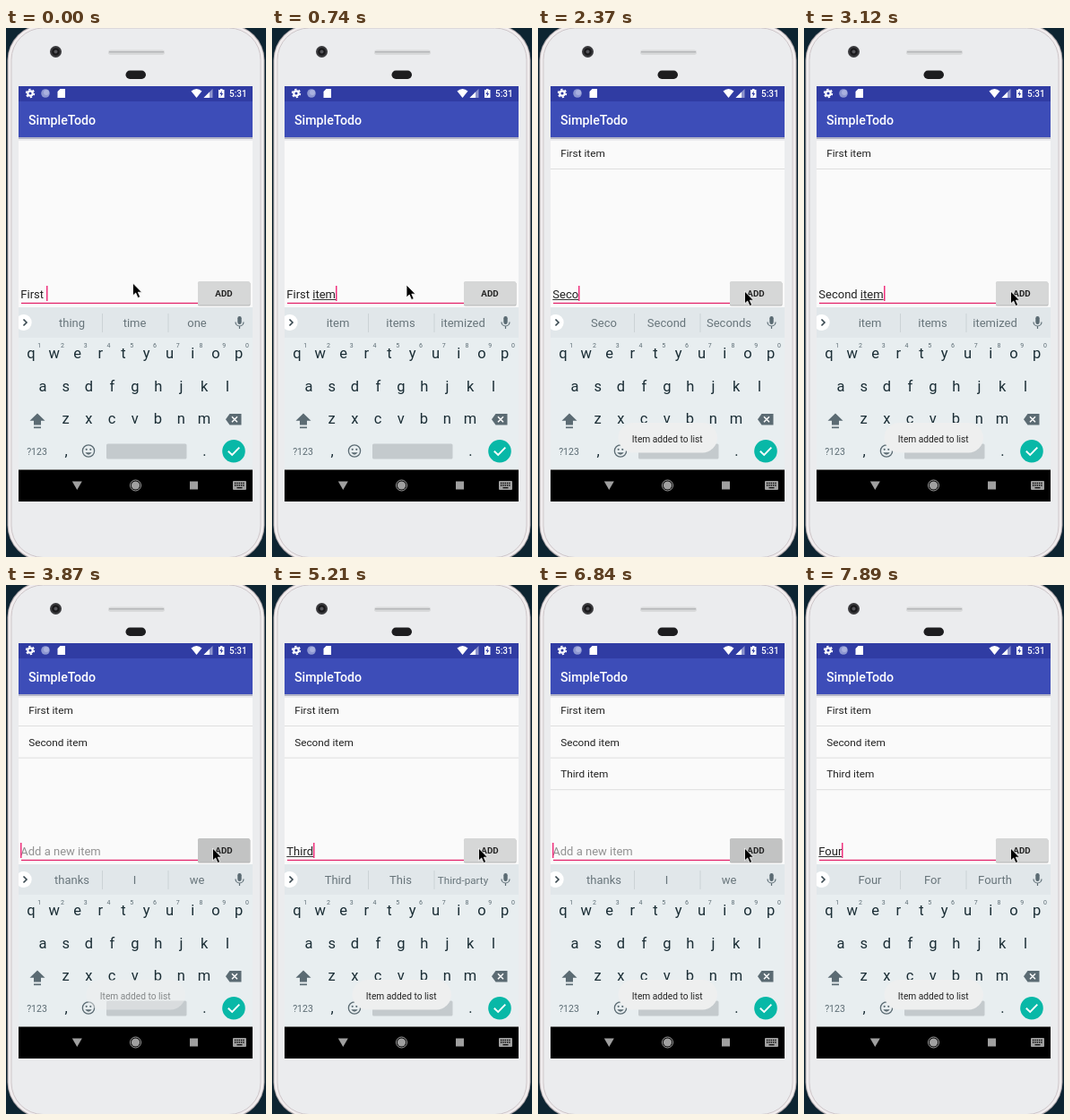
These frames come from a looping animation (290 px wide and 591 px high, 8000 ms). An HTML page:

```html
<!DOCTYPE html>
<html lang="en">
<head>
<meta charset="utf-8">
<title>Todo list on a phone</title>
<style>
  html, body { margin: 0; width: 100%; height: 100%; overflow: hidden; background: #0d2431; }
  svg { display: block; width: 290px; height: 591px; }
  text { font-family: Roboto, sans-serif; white-space: pre; }
  .mid { text-anchor: middle; }
</style>
</head>
<body>
<svg viewBox="0 0 290 591">
  <!-- phone -->
  <rect x="1.5" y="-4" width="287" height="599.5" rx="40" fill="#a9a2a6"/>
  <rect x="2.5" y="-3" width="285" height="597.5" rx="39" fill="#f1edee"/>
  <rect x="6" y="0" width="278" height="591.5" rx="35.5" fill="#ebecee" stroke="#cdc6c9"/>
  <circle cx="55.5" cy="26.5" r="6.5" fill="#3a3a3d"/>
  <circle cx="55.5" cy="26.5" r="4.300" fill="#19191b"/>
  <circle cx="55.5" cy="26.5" r="2" fill="#55555a"/>
  <rect x="114" y="24.5" width="63" height="5.5" rx="2.7" fill="#d8d9da"/>
  <rect x="115" y="26" width="61" height="1.500" fill="#b6b7b9"/>
  <rect x="133.5" y="47.5" width="22.5" height="9.5" rx="4.7" fill="#1d1d1f"/>

  <!-- app -->
  <rect x="14" y="65" width="261" height="464" fill="#fafafa"/>
  <rect x="14" y="122" width="261" height="2" fill="#b3b5c6"/>
  <rect x="14" y="124" width="261" height="2" fill="#ececef"/>
  <rect x="14" y="65" width="261" height="17" fill="#303ca3"/>
  <rect x="14" y="82" width="261" height="40" fill="#3d4db8"/>
  <text x="25" y="107.500" font-size="14.2" font-weight="500" fill="#fff">SimpleTodo</text>
  <g fill="#fff">
    <circle cx="27" cy="73" r="2.7" fill="none" stroke="#fff" stroke-width="2.2"/>
    <circle cx="27" cy="73" r="4.4" fill="none" stroke="#fff" stroke-width="1.6" stroke-dasharray="2.3 2.3"/>
    <circle cx="44" cy="73" r="4.8" fill="#8e98d2"/>
    <circle cx="45" cy="72" r="3" fill="#a9b1df"/>
    <path d="M60.500 68H66V78H57.500V71Z"/>
    <path d="M206.500 70.500Q212.500 65.500 218.500 70.500L212.500 78Z"/>
    <path d="M230.500 68V78H220.500Z" opacity=".45"/>
    <path d="M227 71.500V78H220.500Z"/>
    <path d="M237 69H239V68H241.500V69H243.500V78H237Z"/>
    <path d="M241 70L238.300 74H240L239.500 77L242.200 73H240.500Z" fill="#303ca3"/>
    <text x="249" y="77" font-size="10" font-weight="500">5:31</text>
  </g>
  <g id="list" font-size="11.8" fill="#222"></g>

  <!-- entry row -->
  <rect x="17" y="306.800" width="197" height="1.300" fill="#e3256b"/>
  <text id="hint" x="16.300" y="301.500" font-size="13" fill="#929292">Add a new item</text>
  <text id="entry" x="16.300" y="301.500" font-size="13" fill="#222"></text>
  <rect id="under" y="303" height="1" fill="#333"/>
  <rect id="caret" y="288" width="1.500" height="17" fill="#f0307c"/>
  <rect x="214" y="284" width="58.500" height="26.500" rx="1.500" fill="#b5b6b6"/>
  <rect id="button" x="214" y="283" width="58" height="26.500" rx="1.500"/>
  <text class="mid" x="243" y="300" font-size="9.800" font-weight="600" fill="#222">ADD</text>

  <!-- keyboard -->
  <rect x="14" y="312" width="261" height="181" fill="#e8eef0"/>
  <rect x="14" y="312" width="261" height="34" fill="#e1e7ea"/>
  <path d="M107.500 319V340M181 319V340" stroke="#cbd3d6"/>
  <path d="M14 322A9 9 0 1 1 14 336Z" fill="#fff"/>
  <path d="M19.500 325.500L23 329L19.500 332.500" fill="none" stroke="#37474f" stroke-width="1.600"/>
  <g id="words" class="mid" fill="#68757b"></g>
  <g fill="#5b6b73">
    <rect x="258.300" y="322" width="4.400" height="9" rx="2.200"/>
    <path d="M256 328.500A4.500 4.500 0 0 0 265 328.500M260.500 333V336" fill="none" stroke="#5b6b73" stroke-width="1.200"/>
    <path d="M35 430.500L43.500 438.800H39V443.500H31V438.800H26.500Z"/>
    <rect x="31" y="445.500" width="8" height="1.700"/>
    <path d="M249.500 431H262.500V443.500H249.500L245 437.200Z"/>
    <path d="M252 434.200L258 440.200M258 434.200L252 440.200" stroke="#fff" stroke-width="1.500"/>
    <circle cx="92" cy="472.500" r="6.600" fill="none" stroke="#5b6b73" stroke-width="1.300"/>
    <circle cx="89.700" cy="470.800" r="1.100"/>
    <circle cx="94.300" cy="470.800" r="1.100"/>
    <path d="M88.300 474.300Q92 479 95.700 474.300Z"/>
    <text class="mid" x="34.500" y="477" font-size="10.500">?123</text>
  </g>
  <rect x="112" y="464.500" width="89.500" height="17" rx="1.500" fill="#c4cacd"/>
  <circle cx="254" cy="472.700" r="12.800" fill="#08b8a7"/>
  <path d="M247.800 472.800L252.200 477L260.300 468.600" fill="none" stroke="#fff" stroke-width="1.900"/>
  <g id="keys" class="mid" font-size="16.500" fill="#1a2d35"></g>

  <!-- navigation bar -->
  <rect x="14" y="493.500" width="261" height="35.500" fill="#000"/>
  <g fill="#a0a0a0">
    <path d="M73.800 506.500H84.800L79.300 516Z"/>
    <circle cx="144.500" cy="511" r="4.600"/>
    <circle cx="144.500" cy="511" r="6" fill="none" stroke="#a0a0a0"/>
    <rect x="205" y="506.500" width="9" height="9"/>
    <rect x="253" y="506" width="15" height="10" rx="1"/>
    <path d="M255 508.500H266M255 511H266" stroke="#000" stroke-width="1.300" stroke-dasharray="1.300 1"/>
    <path d="M257.500 513.700H263.500" stroke="#000" stroke-width="1.200"/>
  </g>

  <g id="toast">
    <rect x="89.500" y="441" width="110.500" height="33.500" rx="16.700" fill="#eeefef"/>
    <text class="mid" x="144.200" y="463" font-size="10.200" fill="#222">Item added to list</text>
  </g>
  <path id="mouse" d="M0 0V14L3.200 11L5.600 16.500L8.200 15.400L5.800 10.200H10Z" fill="#000" stroke="#fff" stroke-width=".8"/>
</svg>
<script>
const $ = id => document.getElementById(id);

function add(parent, tag, attrs, text = '') {
  const el = document.createElementNS('http://www.w3.org/2000/svg', tag);
  for (const name in attrs) el.setAttribute(name, attrs[name]);
  el.textContent = text;
  return parent.appendChild(el);
}

function keyRow(letters, x, y) {
  [...letters].forEach((c, i) => add($('keys'), 'text', { x: x + i * 25.75, y }, c));
}
keyRow('qwertyuiop', 28, 369);
keyRow('asdfghjkl', 41, 405.5);
keyRow('zxcvbnm', 66.5, 442);
keyRow(',', 67, 477.5);
keyRow('.', 221.5, 477.5);
[...'1234567890'].forEach((c, i) =>
  add($('keys'), 'text', { x: 37.3 + i * 25.75, y: 357, 'font-size': 7, fill: '#5b6b73' }, c));

const rows = ['First item', 'Second item', 'Third item'].map((name, i) => {
  const g = add($('list'), 'g', {}), y = i * 35.6;
  add(g, 'text', { x: 25.2, y: 144 + y }, name);
  add(g, 'rect', { x: 14, y: 157 + y, width: 261, height: 1, fill: '#dedede' });
  return g;
});
const slots = [73.5, 143.5, 213].map(x => add($('words'), 'text', { x, y: 334 }));

const type = (text, words) => ({ text, words });
const press = { pressed: true };
const added = n => ({ ...type('', 'thanks I we'), count: n, toast: 0.5 });
const show = toast => ({ toast });
const release = { pressed: false };
const move = (x, y) => ({ mouse: [x, y] });
const ITEM = 'item items itemized';

// Each step: start time in ms and what changes then.
const steps = [
  [0, { ...type('First ', 'thing time one'), count: 0, toast: 0, pressed: false, mouse: [141.5, 285] }],
  [150, type('First i', 'I in is')],
  [300, type('First ite', 'ite item items')],
  [440, type('First item', ITEM)],
  [740, move(150, 287)],
  [880, move(178, 292)],
  [1030, move(212, 295)],
  [1180, move(230.5, 294)],
  [1320, press],
  [1470, added(1)],
  [1620, show(0.9)],
  [1770, { ...show(1), ...release }],
  [1920, type('S', 'S So Sorry')],
  [2070, type('Sec', 'Sec Second Secret')],
  [2370, type('Seco', 'Seco Second Seconds')],
  [2520, type('Second', 'Second Seconds Secondary')],
  [2670, type('Second ', 'time one half')],
  [2820, type('Second i', 'I in is')],
  [2970, type('Second ite', 'ite item items')],
  [3120, type('Second item', ITEM)],
  [3420, show(0.5)],
  [3570, show(0)],
  [3720, press],
  [3870, added(2)],
  [4020, show(0.9)],
  [4160, show(1)],
  [4310, release],
  [4460, type('T', 'T The This')],
  [4610, type('Th', 'Th The This')],
  [4910, type('Thi', 'Thi This Think')],
  [5060, type('Thir', 'Thir Third Thirty')],
  [5210, type('Third', 'Third This Third-party')],
  [5360, type('Third ', 'party time one')],
  [5510, type('Third i', 'I in is')],
  [5650, type('Third it', 'it its item')],
  [5800, type('Third ite', 'ite item items')],
  [5950, { ...type('Third item', ITEM), toast: 0.7 }],
  [6100, show(0.35)],
  [6250, show(0)],
  [6400, press],
  [6550, added(3)],
  [6700, show(0.9)],
  [6840, show(1)],
  [6990, release],
  [7290, type('Fo', 'Fo For From')],
  [7440, type('Fou', 'Fou For Found')],
  [7890, type('Four', 'Four For Fourth')]
];

function draw(s) {
  const entry = $('entry'), word = s.text.lastIndexOf(' ') + 1;
  entry.textContent = s.text;
  const edge = n => 16.3 + (n ? entry.getSubStringLength(0, n) : 0);
  const end = edge(s.text.length), start = edge(word);
  $('caret').setAttribute('x', Math.round(end));
  $('under').setAttribute('x', start);
  $('under').setAttribute('width', end - start);
  $('hint').style.display = s.text ? 'none' : '';
  $('button').setAttribute('fill', s.pressed ? '#c2c3c3' : '#d6d7d7');
  $('toast').setAttribute('opacity', s.toast);
  $('mouse').setAttribute('transform', `translate(${s.mouse})`);
  rows.forEach((g, i) => g.style.display = i < s.count ? '' : 'none');
  s.words.split(' ').forEach((w, i) => {
    const slot = slots[i];
    slot.textContent = w;
    slot.style.fontSize = '13px';
    const size = 13 * Math.min(1, 56.5 / slot.getComputedTextLength());
    slot.style.fontSize = size + 'px';
  });
}

let last;
function tick() {
  const t = performance.now() % 8000;
  const past = steps.filter(([at]) => at <= t);
  if (past.length !== last) {
    last = past.length;
    draw(Object.assign({}, ...past.map(([, change]) => change)));
  }
  requestAnimationFrame(tick);
}
tick();
</script>
</body>
</html>
```
